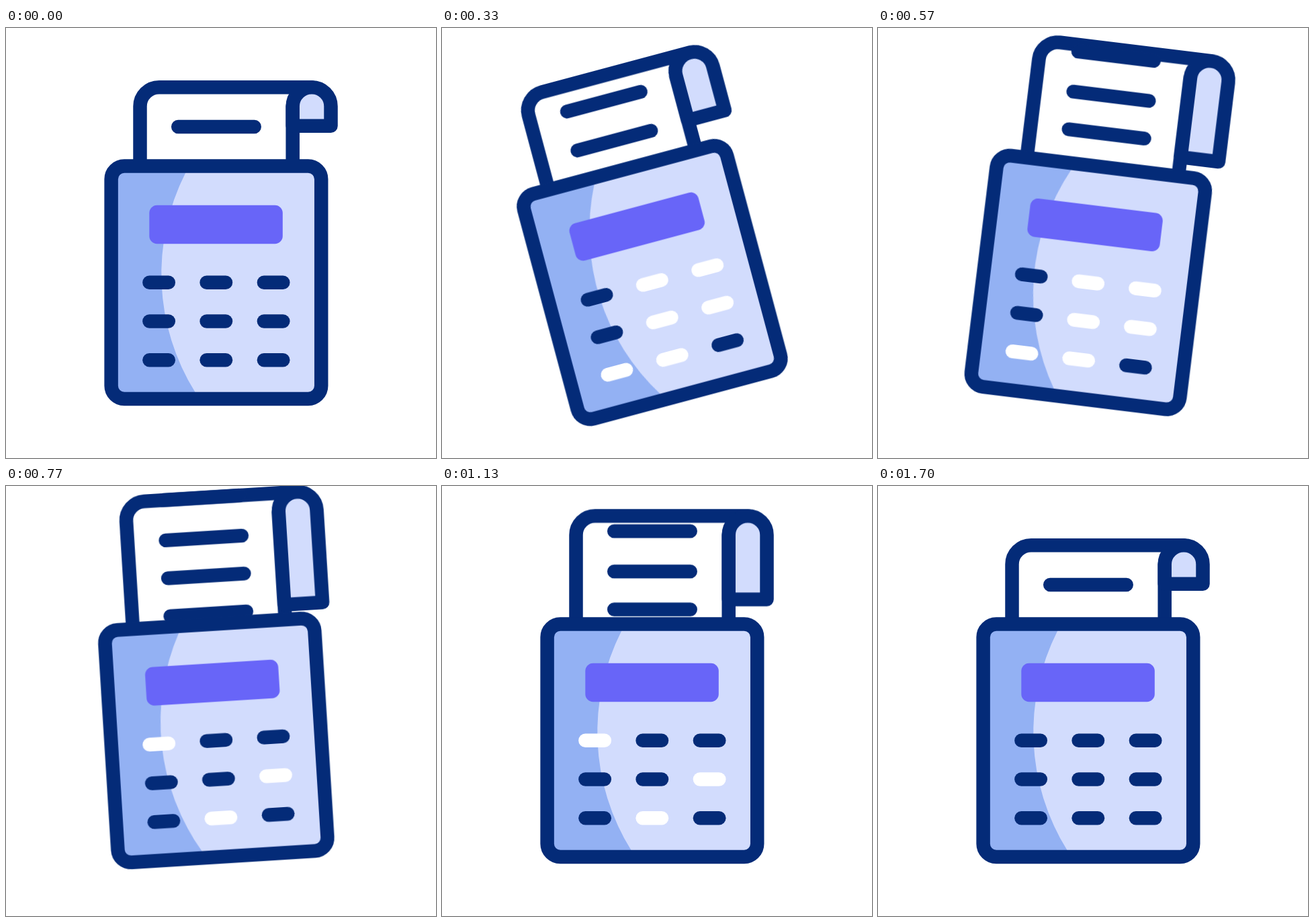
An HTML page for the animation above (2 s loop, 640x640 px).

```html
<!DOCTYPE html>
<html lang="en">
<head>
<meta charset="utf-8">
<title>Receipt printer</title>
<style>
  :root { --navy: #042b78; --light: #d2dcfd; --shade: #93b1f3; --screen: #6865f8; }
  html, body { margin: 0; width: 100%; height: 100%; overflow: hidden; background: #fff; }
  svg { display: block; width: 100%; height: 100%; }

  path, rect { fill: none; }
  .ink { stroke: var(--navy); stroke-width: 20.5; stroke-linecap: round; stroke-linejoin: round; }

  .machine, .paper, .lines, .curl { animation: 2s ease-in-out infinite; }
  .machine { transform-origin: 313px 378.7px; animation-name: sway; }
  .paper { animation-name: feed; }
  .lines { animation-name: print; }
  .curl { fill: var(--light); animation-name: unroll; }

  .keys path { --b: var(--navy); --c: var(--navy); --d: var(--navy); animation: blink 2s step-end infinite; }
  .keys .b { --b: #fff; }
  .keys .c { --c: #fff; }
  .keys .d { --d: #fff; }

  @keyframes sway {
    0%, 51.667%, 100% { transform: rotate(0deg); }
    16.667% { transform: rotate(-15deg); }
    28.333% { transform: rotate(7deg); }
    40% { transform: rotate(-4deg); }
  }
  @keyframes feed {
    0%, 78.333%, 100% { transform: translateY(0); }
    40% { transform: translateY(-71.6px); }
  }
  @keyframes print {
    0%, 78.333%, 100% { transform: translateY(0); }
    40% { transform: translateY(-130.6px); }
  }
  /* The flap grows by the paper's rise plus its own drop. */
  @keyframes unroll {
    0%, 78.333%, 100% { d: path("M426.7 116.6 A28.4 28.4 0 0 1 483.5 116.6 L483.5 145.7 L426.7 145.7 Z"); }
    40% { d: path("M426.7 116.6 A28.4 28.4 0 0 1 483.5 116.6 L483.5 255.1 L426.7 255.1 Z"); }
  }
  @keyframes blink {
    0%, 81.667%, 100% { stroke: var(--navy); }
    11.667% { stroke: var(--b); }
    35% { stroke: var(--c); }
    58.333% { stroke: var(--d); }
  }
</style>
</head>
<body>
<svg viewBox="0 0 640 640">
  <g class="machine">
    <g class="paper">
      <path class="ink" d="M199.5 330 V116.6 A28.4 28.4 0 0 1 227.9 88.2 H455.1 M426.7 330 V116.6"/>
      <path class="ink curl" d="M426.7 116.6 A28.4 28.4 0 0 1 483.5 116.6 L483.5 145.7 L426.7 145.7 Z"/>
    </g>
    <path class="ink lines" d="M256.2 147 h113.5 M256.2 207 h113.5 M256.2 263.5 h113.5 M256.2 320 h113.5"/>

    <rect x="156.6" y="205.5" width="312.6" height="346.5" rx="19.5" style="fill: var(--light)"/>
    <path d="M156 205.5 H270.7 L267 216 A333 333 0 0 0 281.5 542 L288 552 H176 A19.5 19.5 0 0 1 156.6 532.5 V225 A19.5 19.5 0 0 1 176 205.5 Z" style="fill: var(--shade)"/>
    <rect class="ink" x="156.6" y="205.5" width="312.6" height="346.5" rx="19.5"/>
    <rect x="213.3" y="263.8" width="198.5" height="57.4" rx="11.5" style="fill: var(--screen)"/>

    <g class="keys">
      <path class="ink c d" d="M213.4 378.7 h28.4"/>
      <path class="ink b d" d="M298.6 378.7 h28.4"/>
      <path class="ink b d" d="M383.9 378.7 h28.4"/>
      <path class="ink d" d="M213.4 436.4 h28.4"/>
      <path class="ink b" d="M298.6 436.4 h28.4"/>
      <path class="ink b c d" d="M383.9 436.4 h28.4"/>
      <path class="ink b" d="M213.4 494.2 h28.4"/>
      <path class="ink b c d" d="M298.6 494.2 h28.4"/>
      <path class="ink" d="M383.9 494.2 h28.4"/>
    </g>
  </g>
</svg>
<script>
  // Drive the keyframes from a 30 fps clock so the motion is stepped evenly.
  const STEP = 1000 / 30;
  const start = performance.now();
  const anims = document.getAnimations();
  anims.forEach(a => a.pause());

  function tick() {
    const t = (performance.now() - start) % 2000;
    const snapped = Math.floor((t + 4) / STEP) * STEP + 0.1;
    anims.forEach(a => { a.currentTime = snapped; });
    requestAnimationFrame(tick);
  }
  tick();
</script>
</body>
</html>
```
